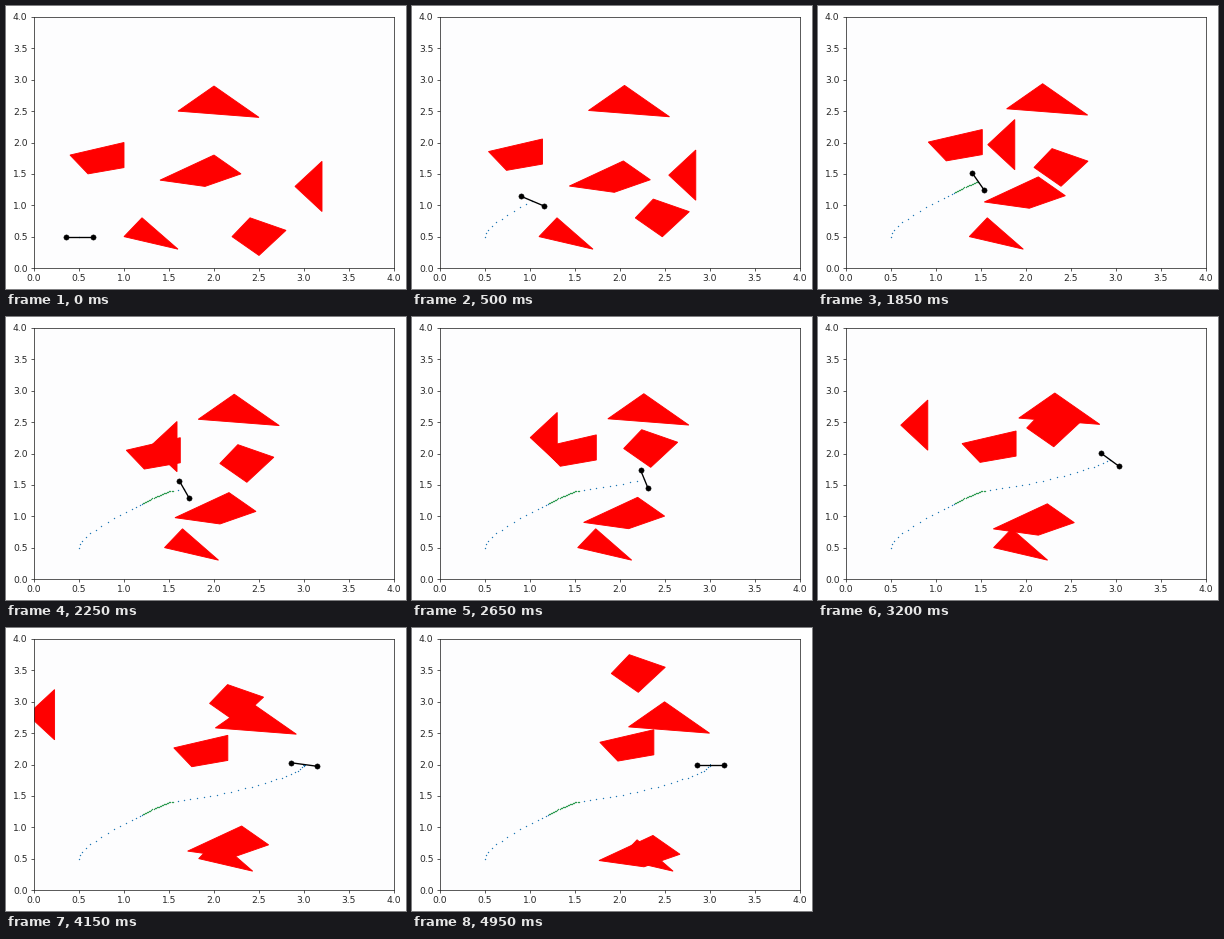
Recreate the animation shown at these times as a matplotlib script. Size 400 by 283 pixels, loop 5000 ms.

```python
import numpy as np
import matplotlib.pyplot as plt
from matplotlib.animation import FuncAnimation
from matplotlib.patches import Polygon

W, H, DPI = 400, 283, 100
FRAMES, INTERVAL = 100, 50
PX = 72 / DPI  # points per pixel
BAR = 0.15     # half length of the robot bar
INK = "#262626"

# corners and velocity per frame of each drifting obstacle
OBSTACLES = [
    ([(1.6, 2.5), (2.0, 2.9), (2.5, 2.4)], (0.005, 0.001)),
    ([(0.4, 1.8), (1.0, 2.0), (1.0, 1.6), (0.6, 1.5)], (0.0139, 0.0056)),
    ([(1.4, 1.4), (2.0, 1.8), (2.3, 1.5), (1.9, 1.3)], (0.0037, -0.0094)),
    ([(1.0, 0.5), (1.2, 0.8), (1.6, 0.3)], (0.01, 0)),
    ([(2.2, 0.5), (2.4, 0.8), (2.8, 0.6), (2.5, 0.2)], (-0.003, 0.0298)),
    ([(2.9, 1.3), (3.2, 1.7), (3.2, 0.9)], (-0.0358, 0.018)),
]

# the robot sets off, creeps while the way is blocked, then runs to its goal
CREEP, RUN, ARRIVE = 15, 43, 68
TURN_BACK = 53


def bezier(n, start, end, p0, p1, p2, p3):
    """Cubic Bezier run through between two frames."""
    u = np.clip((n - start) / (end - start), 0, 1)
    v = 1 - u
    p0, p1, p2, p3 = np.array([p0, p1, p2, p3], float)
    return p0 * v**3 + 3 * p1 * u * v**2 + 3 * p2 * u**2 * v + p3 * u**3


def centre(n):
    if n < CREEP:
        return bezier(n, 0, CREEP, (0.5, 0.5), (0.5, 0.75), (1.21, 1.18), (1.21, 1.205))
    if n < RUN:
        return bezier(n, CREEP, RUN, (1.21, 1.205), (1.32, 1.29), (1.43, 1.365), (1.54, 1.41))
    return bezier(n, RUN, ARRIVE, (1.54, 1.41), (2.04, 1.47), (3.0, 1.82), (3.0, 2.0))


def tilt(n):
    """Angle of the bar in degrees."""
    if n < TURN_BACK:
        return bezier(n, 0, TURN_BACK, 0, -69, -58, -74)
    return bezier(n, TURN_BACK, FRAMES - 1, -74, -33, 0, 0)


steps = np.arange(FRAMES)
path = np.array([centre(n) for n in steps])
slow = (steps >= CREEP) & (steps <= RUN)

fig = plt.figure(figsize=(W / DPI, H / DPI), dpi=DPI, facecolor="white")
ax = fig.add_axes([28 / W, 21 / H, 360 / W, 251 / H], facecolor="#fdfdfe")
ax.set(xlim=(0, 4), ylim=(0, 4))
ticks = np.arange(0, 4.1, 0.5)
ax.set_xticks(ticks, [f"{v:.1f}" for v in ticks])
ax.set_yticks(ticks, [f"{v:.1f}" for v in ticks])
ax.tick_params(labelsize=9.2 * PX, length=3.2 * PX, width=0.75 * PX,
               pad=3.2 * PX, labelfontfamily="DejaVu Sans",
               color=INK, labelcolor=INK)
for spine in ax.spines.values():
    spine.set(linewidth=0.75 * PX, edgecolor=INK)

shapes = [ax.add_patch(Polygon(corners, color="red", lw=0.9 * PX))
          for corners, _ in OBSTACLES]


def dots(color):
    return ax.plot([], [], "o", ms=1.4 * PX, mew=0, color=color)[0]


trails = [(dots("#1f77b4"), ~slow), (dots("#2c9a50"), slow)]
bar, = ax.plot([], [], "o-", color="black", lw=1.35 * PX, ms=5.2 * PX,
               mew=0.5 * PX)


def draw(n):
    for shape, (corners, velocity) in zip(shapes, OBSTACLES):
        shape.set_xy(np.array(corners) + n * np.array(velocity))
    for line, mask in trails:
        line.set_data(*path[mask & (steps <= n)].T)
    angle = np.radians(tilt(n))
    arm = BAR * np.array([np.cos(angle), np.sin(angle)])
    bar.set_data(*np.array([path[n] - arm, path[n] + arm]).T)
    return [*shapes, *(line for line, _ in trails), bar]


anim = FuncAnimation(fig, draw, frames=FRAMES, interval=INTERVAL,
                     repeat=True, repeat_delay=0)
plt.show()
```
